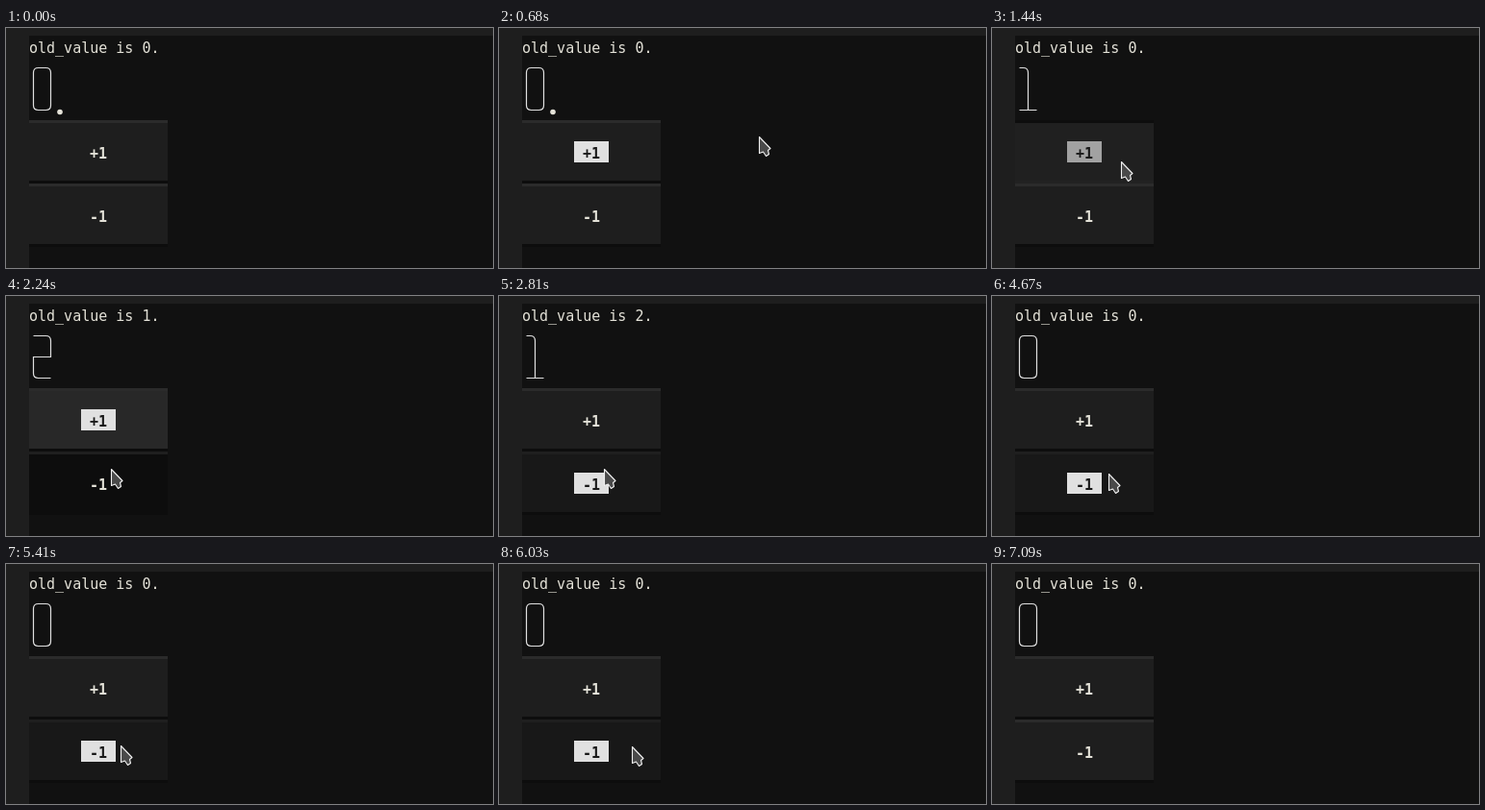
Animation, 506 px wide and 250 px high, one loop 7.17 s. Source, as an HTML page with a canvas:

```html
<!DOCTYPE html>
<html lang="en">
<head>
<meta charset="utf-8">
<title>Counter</title>
<style>
  html, body { margin: 0; width: 100%; height: 100%; overflow: hidden; background: #1e1e1e; }
  canvas { display: block; }
</style>
</head>
<body>
<canvas id="stage" width="506" height="250"></canvas>
<script>
const ctx = document.getElementById('stage').getContext('2d');
const LOOP = 7170, LEFT = 24, TOP = 8, CELL = 9, ROW = 22;
const INK = '#e4e2d8', LIGHT = '#e0e0e0', DARK = '#0d0d0d';

// Each click shows a ring, presses the button, updates the counter, then releases.
const PRESS = 80, UPDATE = 140, RELEASE = 280;
const clicks = [
  ...[1280, 1720].map(time => ({ time, label: '+1' })),
  ...[2530, 3140, 3710, 4830, 5700].map(time => ({ time, label: '-1' }))
];
const FOCUS_IN = 120, FOCUS_OUT = 7090, HOVER_IN = 2240, HOVER_OUT = 6110;

// Pointer moves: start, end, destination x, y
const moves = [
  [120, 120, 374, 59], [120, 800, 248, 124], [800, 1120, 134, 139],
  [2000, 2200, 109, 180], [4070, 4350, 253, 178], [4350, 4670, 121, 185],
  [5370, 5490, 116, 197], [5990, 6030, 137, 191], [6030, 6270, 448, 0]
];
const POINTER_GONE = 6310;

const digitShapes = [
  'M33.5 41.5h8q5 0 5 5v34q0 5 -5 5h-8q-5 0 -5 -5v-34q0 -5 5 -5z',
  'M28.5 41.5h4q5 0 5 5v39m-9 0h18',
  'M28.5 41.5h13q5 0 5 5v17h-18v17q0 5 5 5h13'
].map(d => new Path2D(d));
const arrow = new Path2D('M.5 .5v17l4 -1.5l3 4.5l3 -2l-1 -4l2.5 -2z');

const within = (t, from, to) => t >= from && t < to;

function counterAt(t) {
  let value = 0, old = 0;
  for (const { time, label } of clicks) {
    if (t < time + UPDATE) break;
    old = value;
    value = Math.max(0, value + Number(label));
  }
  return { value, old };
}

function focusAt(t) {
  if (!within(t, FOCUS_IN, FOCUS_OUT)) return '';
  const last = clicks.filter(({ time }) => t >= time + PRESS).pop();
  return last ? last.label : '+1';
}

function pointerAt(t) {
  if (!within(t, moves[0][0], POINTER_GONE)) return null;
  let x = 0, y = 0;
  for (const [start, end, toX, toY] of moves) {
    if (t < start) break;
    const k = t >= end ? 1 : (t - start) / (end - start);
    x += (toX - x) * k;
    y += (toY - y) * k;
  }
  return [Math.round(x), Math.round(y)];
}

function rect(x, y, w, h, color) {
  ctx.fillStyle = color;
  ctx.fillRect(x, y, w, h);
}

function write(text, x, baseline, color, weight = 400) {
  ctx.font = `${weight} 15px "DejaVu Sans Mono", monospace`;
  ctx.fillStyle = color;
  ctx.fillText(text, x, baseline);
}

function disc(x, y, r, color) {
  ctx.fillStyle = color;
  ctx.beginPath();
  ctx.arc(x, y, r, 0, Math.PI * 2);
  ctx.fill();
}

function drawButton(label, y, t) {
  const focused = focusAt(t) === label;
  const hovered = label === '-1' && within(t, HOVER_IN, HOVER_OUT);
  const active = clicks.some(click =>
    click.label === label && within(t, click.time + PRESS, click.time + RELEASE));

  let fill = focused && within(t, clicks[0].time, HOVER_OUT) ? '#282828' : '#1e1e1e';
  if (hovered) fill = focused ? '#181818' : DARK;
  if (active) fill = hovered ? '#161616' : '#202020';

  rect(LEFT, y, 16 * CELL, 3 * ROW, fill);
  rect(LEFT, y, 16 * CELL, 3, active ? DARK : hovered ? '#1f1f1f' : '#2b2b2b');
  rect(LEFT, y + 63, 16 * CELL, 3, active ? '#222222' : DARK);
  if (focused) rect(LEFT + 6 * CELL, y + ROW, 4 * CELL, ROW, active ? '#a2a2a2' : LIGHT);
  write(label, LEFT + 7 * CELL, y + 40, focused ? '#181818' : INK, 700);
}

function drawPointer(x, y, ringed) {
  if (ringed) disc(x, y + 2, 15, 'rgba(255, 255, 0, .5)');
  ctx.save();
  ctx.translate(x, y);
  ctx.fillStyle = '#4a4a4a';
  ctx.strokeStyle = '#f0f0f0';
  ctx.lineWidth = 1.1;
  ctx.lineJoin = 'round';
  ctx.fill(arrow);
  ctx.stroke(arrow);
  ctx.restore();
}

function draw(t) {
  const { value, old } = counterAt(t);
  rect(0, 0, 506, 250, '#1e1e1e');
  rect(LEFT, TOP, 482, 242, '#111111');
  write(`old_value is ${old}.`, LEFT, TOP + 18, INK);

  ctx.strokeStyle = LIGHT;
  ctx.lineWidth = 1.2;
  ctx.stroke(digitShapes[value]);
  if (t < clicks[0].time) disc(56, 87.5, 2.8, INK);

  drawButton('+1', TOP + 4 * ROW, t);
  drawButton('-1', TOP + 7 * ROW, t);

  const pointer = pointerAt(t);
  if (pointer) drawPointer(...pointer, clicks.some(({ time }) => within(t, time, time + PRESS)));
}

const start = performance.now();
function frame() {
  draw((performance.now() - start) % LOOP);
  requestAnimationFrame(frame);
}
frame();
</script>
</body>
</html>
```
